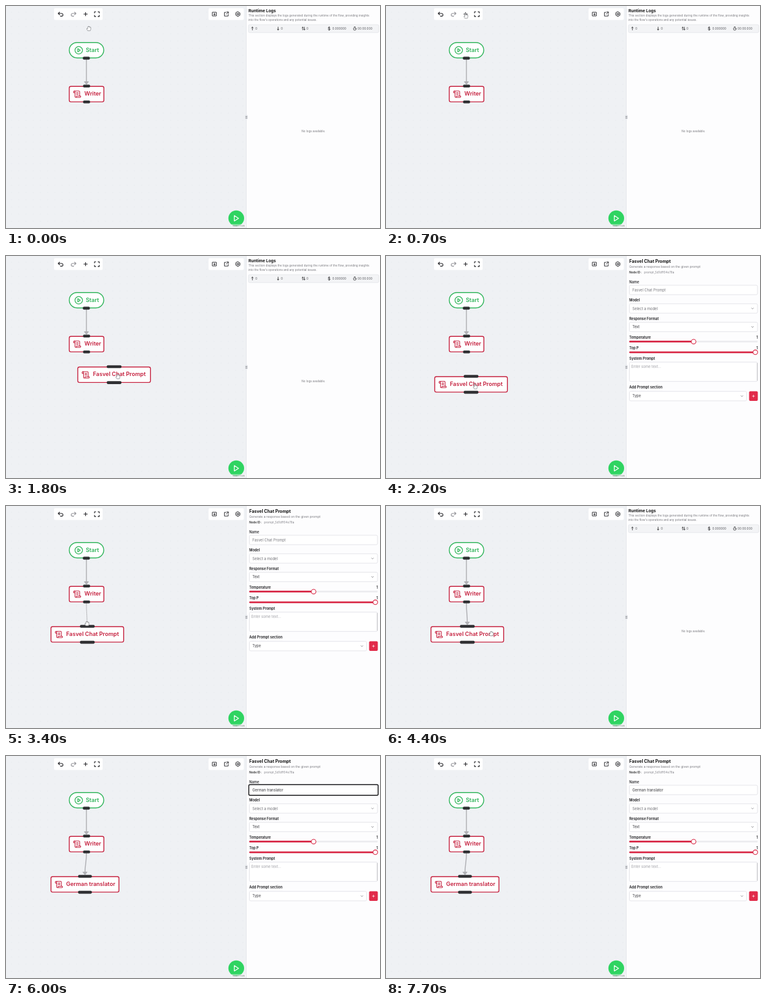
These frames come from a looping animation (600x357 px, 8000 ms). An HTML page:

```html
<!DOCTYPE html>
<html lang="en">
<head>
<meta charset="utf-8">
<title>Flow editor</title>
<style>
html, body { margin: 0; width: 100%; height: 100%; overflow: hidden; background: #eff1f4; }
svg { display: block; width: 600px; height: 357px; }
text { font-family: Inter, "Open Sans", sans-serif; white-space: pre; }
.node { font-size: 9px; font-weight: 600; }
.label { font-size: 5.6px; font-weight: 600; fill: #18181b; }
.value { font-size: 5.8px; }
.small { font-size: 4.6px; }
.line { fill: none; stroke-linecap: round; stroke-linejoin: round; }
.box { fill: #fff; stroke: #dfdfe4; stroke-width: .8; }
</style>
</head>
<body>
<svg viewBox="0 0 600 357" xmlns="http://www.w3.org/2000/svg">
  <defs>
    <pattern id="dots" x="3" y="4" width="11.6" height="11.6" patternUnits="userSpaceOnUse">
      <circle cx="5.8" cy="5.8" r=".5" fill="#d9dce1"/>
    </pattern>
    <g id="scroll" class="line" stroke="#c5203e" stroke-width="1.9">
      <path d="M19 17V5a2 2 0 0 0-2-2H4"/>
      <path d="M8 21h12a2 2 0 0 0 2-2v-1a1 1 0 0 0-1-1H11a1 1 0 0 0-1 1v1a2 2 0 1 1-4 0V5a2 2 0 1 0-4 0v2a1 1 0 0 0 1 1h3M10 8h5M10 12h5"/>
    </g>
    <path id="chev" class="line" d="M-1.6-.8 0 .9 1.6-.8" stroke="#77777d" stroke-width=".7"/>
  </defs>
  <rect width="386" height="357" fill="#eff1f4"/>
  <rect width="386" height="357" fill="url(#dots)"/>

  <g fill="#fff">
    <rect x="77" y="3.5" width="78" height="19" rx="2"/>
    <rect x="325" y="3.5" width="56.5" height="19" rx="2"/>
  </g>
  <g class="line" stroke="#202024" stroke-width="1.1">
    <path d="M86 9.8 83.8 12 86 14.2M84 12h5.2a2.2 2.2 0 0 1 0 4.4H87.4"/>
    <path d="M110 9.8 112.2 12 110 14.2M112 12h-5.2a2.2 2.2 0 0 0 0 4.4H108.600" stroke="#909096"/>
    <path d="M127.700 10.200v5.600M124.900 13h5.600"/>
    <path d="M142 11.300V9.300h2M147.600 9.300h2v2M149.600 14.900v2h-2M144 16.900h-2v-2"/>
    <path d="M331.400 10h6v6h-6zM334.400 11.500v3M333 13.200l1.400 1.400 1.400-1.400" stroke-width=".9"/>
    <path d="M353 10.200h-2.600v6h6v-2.600M353.300 13.200l3.500-3.500M354.300 9.600h2.500v2.500" stroke-width=".9"/>
    <path d="M372 9.300l3.200 1.850v3.700L372 16.700l-3.200-1.850v-3.700z" stroke-width="1"/>
    <circle cx="372" cy="13" r="1.300" stroke-width=".9"/>
  </g>

  <g id="edges"></g>

  <rect x="101.500" y="58.700" width="55.300" height="24.800" rx="12.400" fill="#fff" stroke="#2fb45a" stroke-width="1.400"/>
  <g class="line" stroke="#2fb45a" stroke-width="1.200">
    <circle cx="116.700" cy="71.200" r="6"/>
    <path d="M115.200 68.600v5.200l3.900-2.600z"/>
  </g>
  <text class="node" x="128" y="74.400" fill="#2fb45a">Start</text>
  <rect x="123.300" y="81.500" width="11.200" height="4.800" rx="1.800" fill="#303033"/>

  <g id="nodes"></g>

  <circle cx="369.400" cy="341.300" r="12.600" fill="#2fd461"/>
  <path class="line" d="M366.300 337v8.800l6.800-4.400z" stroke="#fff" stroke-width="1.200"/>
  <rect x="362" y="350.800" width="23.500" height="5" fill="#fff" fill-opacity=".45"/>
  <text x="363.500" y="354.500" font-size="3.800" fill="#8b8d92">React Flow</text>

  <rect x="385.500" width="214.500" height="357" fill="#fdfdfe"/>
  <path d="M385.500 0V357" stroke="#e1e3e7" stroke-width=".8"/>

  <g id="logs">
    <text x="389" y="10" font-size="6.600" font-weight="700" fill="#111">Runtime Logs</text>
    <g class="small" fill="#77777d">
      <text x="389" y="17.400">This section displays the logs generated during the runtime of the flow, providing insights</text>
      <text x="389" y="24.300">into the flow's operations and any potential issues.</text>
      <text x="493.300" y="203.300" text-anchor="middle">No logs available.</text>
    </g>
    <rect x="389" y="30" width="209" height="12.800" rx="2" fill="#f3f4f6" stroke="#e0e1e5" stroke-width=".7"/>
    <g class="line" stroke="#27272a" stroke-width=".8">
      <path d="M395.300 38.700v-4.800M393.900 35.300l1.400-1.400 1.400 1.400"/>
      <path d="M436.500 33.900v4.800M435.100 37.300l1.400 1.400 1.400-1.400"/>
      <path d="M476 38.500v-4.600M474.900 35l1.100-1.100 1.100 1.100M478.700 33.900v4.600M477.600 37.400l1.100 1.100 1.100-1.100"/>
      <path d="M520 34.600c-.6-.8-3.200-.7-3.200.6 0 1.500 3.400.7 3.400 2.300 0 1.300-2.800 1.300-3.500.3M518.400 33.300v5.900" stroke-width=".7"/>
      <circle cx="559.500" cy="36.800" r="2.200" stroke-width=".7"/>
      <path d="M558.700 33.500h1.600M559.500 36.800l.9-.9" stroke-width=".7"/>
    </g>
    <g font-size="4.800" fill="#55555b">
      <text x="400" y="38.100">0</text>
      <text x="441" y="38.100">0</text>
      <text x="482" y="38.100">0</text>
      <text x="523.500" y="38.100">0.000000</text>
      <text x="564" y="38.100">00:00.000</text>
    </g>
  </g>

  <g id="form">
    <text x="390.300" y="11.400" font-size="7" font-weight="700" fill="#111">Fasvel Chat Prompt</text>
    <text x="390.300" y="18.600" font-size="5" fill="#77777d">Generate a response based on the given prompt</text>
    <text x="390.300" y="28.300" font-size="4.600" font-weight="600" fill="#222">Node ID :</text>
    <text x="414" y="28.300" font-size="4.700" fill="#85858b">prompt_5d1dff04e78a</text>
    <g class="label">
      <text x="390.300" y="44.300" font-weight="500">Name</text>
      <text x="390.300" y="73.100">Model</text>
      <text x="390.300" y="102.700">Response Format</text>
      <text x="390.300" y="132.500">Temperature</text>
      <text x="596.500" y="132.500" text-anchor="end">1</text>
      <text x="390.300" y="149.700">Top P</text>
      <text x="596.500" y="149.700" text-anchor="end">1</text>
      <text x="390.300" y="167.200">System Prompt</text>
      <text x="390.300" y="212.600">Add Prompt section</text>
    </g>
    <g class="box">
      <rect id="field" x="390.500" y="47" width="205.500" height="15.200" rx="2"/>
      <rect x="390.500" y="76.800" width="205.500" height="15.200" rx="2"/>
      <rect x="390.500" y="106.500" width="205.500" height="15.200" rx="2"/>
      <rect x="390.500" y="170.700" width="205.500" height="31" rx="2"/>
      <rect x="390.500" y="217.700" width="188" height="15.200" rx="2"/>
    </g>
    <path d="M595.500 172v28.500" stroke="#bdbdc2" stroke-width=".9"/>
    <use href="#chev" x="588" y="84.400"/>
    <use href="#chev" x="588" y="114.100"/>
    <use href="#chev" x="571" y="225.300"/>
    <g class="value" fill="#6d6d73">
      <text id="name" x="395.300" y="56.800"></text>
      <text x="395.300" y="86.500">Select a model</text>
      <text x="395.300" y="116.200" fill="#3a3a3f">Text</text>
      <text x="393.500" y="180.200" fill="#a0a0a6">Enter some text...</text>
      <text x="395.300" y="227.400" fill="#3a3a3f">Type</text>
    </g>
    <path id="caret" d="M446.500 51v7.400" stroke="#222" stroke-width=".7"/>
    <g stroke-width="2.800" stroke-linecap="round">
      <path d="M391.500 137.700H595" stroke="#ececef"/>
      <path d="M391.500 137.700H493M391.500 154.800H592" stroke="#d82644"/>
    </g>
    <g fill="#fff" stroke="#d82644" stroke-width="1.100">
      <circle cx="493.500" cy="137.700" r="3.700"/>
      <circle cx="592.500" cy="154.800" r="3.700"/>
    </g>
    <rect x="582.500" y="217.600" width="14" height="15.400" rx="2" fill="#e12a49"/>
    <path d="M589.500 223.200v4.200M587.400 225.300h4.200" stroke="#fff" stroke-width=".7"/>
  </g>

  <rect x="383.600" y="175.300" width="4" height="7" rx="1" fill="#e3e5e9"/>
  <path d="M384.900 177v3.800M386.300 177v3.800" stroke="#55575c" stroke-width=".8" stroke-dasharray=".8 .7"/>

  <g id="hand" class="line" stroke="#66686d" stroke-width=".6">
    <path id="grab" fill="#fff" d="M-2.200 3.400C-3 2-3.800.9-3.500.3c.4-.7 1.200.1 1.500.6V-2c0-.9 1.200-.9 1.200 0v-.8c0-.9 1.300-.9 1.300 0v.8c0-.9 1.300-.9 1.300 0v.7c0-.8 1.200-.8 1.200 0v2.500c0 1-.5 1.500-.7 2.200z"/>
    <path id="point" fill="#fff" d="M-1.600 4.500C-2.400 3.100-3.300 2-3 1.400c.4-.7 1.200.1 1.500.6v-5.700c0-.9 1.300-.9 1.300 0V-.8c0-.8 1.200-.8 1.200 0v.3c0-.7 1.200-.7 1.200 0v.4c0-.7 1.100-.7 1.100 0v2.300c0 1-.5 1.500-.7 2.300z"/>
  </g>
</svg>
<script>
const $ = id => document.getElementById(id);
const LOOP = 8000, TITLE = 'Fasvel Chat Prompt', TYPED = 'German translator';

// time, x, y
const handPath = [
  [0, 133, 36], [400, 128, 15], [950, 128, 15], [1200, 183, 105],
  [1500, 184, 192], [1700, 184, 192], [2200, 143, 209], [2400, 137, 209],
  [2800, 129, 156], [3000, 129, 156], [3400, 130, 189], [3500, 130, 193],
  [3700, 160, 178], [4400, 169, 205], [4600, 169, 205], [5000, 430, 55], [5300, 430, 55]
];
const nodePath = [[1700, 119.5, 176.7], [2200, 78.2, 194], [2400, 72.2, 194]];

function along(path, t) {
  let i = path.findIndex(p => p[0] > t);
  if (i < 0) return path[path.length - 1].slice(1);
  if (i === 0) return path[0].slice(1);
  const a = path[i - 1], b = path[i];
  const k = (t - a[0]) / (b[0] - a[0]), e = k * k * (3 - 2 * k);
  return [a[1] + (b[1] - a[1]) * e, a[2] + (b[2] - a[2]) * e];
}

function node(x, y, w, label) {
  const h = w * .203, hx = x + w / 2 - h / 2;
  const port = py => `<rect x="${hx}" y="${py}" width="${h}" height="4.6" rx="1.8" fill="#303033"/>`;
  return `<rect x="${x}" y="${y}" width="${w}" height="24.900" rx="2.600" fill="#fff" stroke="#c5203e" stroke-width="1.400"/>
    <use href="#scroll" transform="translate(${x + 5.8} ${y + 5.8}) scale(.57)"/>
    <text class="node" x="${x + 24.3}" y="${y + 14.6}" fill="#c5203e">${label}</text>` +
    port(y - 2.8) + port(y + 22.8);
}

function edge(x1, y1, x2, y2, linked) {
  const m = (y1 + y2) / 2, end = linked ? y2 - 3 : y2;
  const curve = `<path d="M${x1} ${y1}C${x1} ${m} ${x2} ${m} ${x2} ${end}" fill="none" stroke="#b0b1b5" stroke-width="${linked ? 1.5 : .9}"/>`;
  const tip = `<path d="M${x2 - 3.4} ${y2 - 4.3}h6.800l-3.400 4.300z" fill="#b0b1b5" stroke="#b0b1b5" stroke-linejoin="round"/>`;
  return linked ? curve + tip : curve;
}

const show = (id, on) => $(id).setAttribute('display', on ? 'inline' : 'none');

function draw(t) {
  const [hx, hy] = along(handPath, t), [nx, ny] = along(nodePath, t);
  const count = t < 5400 ? 0 : Math.min(17, Math.ceil((t - 5300) / 100 * 4.25));
  const text = TYPED.slice(0, count);
  const width = count ? 31 + 78 * count / 17 : 116.500;
  const mid = nx + width / 2;

  let edges = edge(129, 86, 129, 126, true);
  if (t >= 3500) edges += edge(129, 156, mid, 191, true);
  else if (t > 3000) edges += edge(129, 156, hx, hy, false);
  $('edges').innerHTML = edges;
  $('nodes').innerHTML = node(101.5, 129.200, 55.500, 'Writer') +
    (t >= 1000 ? node(nx, ny, width, count ? text : TITLE) : '');

  const form = t >= 1900 && t < 3600 || t >= 4500;
  show('form', form);
  show('logs', !form);

  const focus = t >= 5000 && t < 6800, field = $('field');
  field.style.stroke = focus ? '#18181b' : '#dfdfe4';
  field.style.strokeWidth = focus ? 1.5 : .8;
  const grow = focus ? 1 : 0;
  field.setAttribute('x', 390.5 - grow);
  field.setAttribute('y', 47 - grow);
  field.setAttribute('width', 205.5 + 2 * grow);
  field.setAttribute('height', 15.2 + 2 * grow);
  $('name').textContent = count ? text : TITLE;
  $('name').setAttribute('fill', count ? '#333338' : '#77777d');
  const caretX = count ? 51.2 * count / 17 : 0;
  $('caret').setAttribute('transform', `translate(${caretX - 51.2})`);
  show('caret', focus && (t < 5900 || t >= 6500));

  show('hand', t < 5400);
  $('hand').setAttribute('transform', `translate(${hx} ${hy})`);
  const point = t >= 300 && t < 1700 || t >= 2100 && t < 2300;
  show('point', point);
  show('grab', !point);
}

function tick() {
  const t = performance.now() % LOOP;
  draw(Math.floor(t / 100) * 100);
  requestAnimationFrame(tick);
}
draw(0);
requestAnimationFrame(tick);
</script>
</body>
</html>
```
